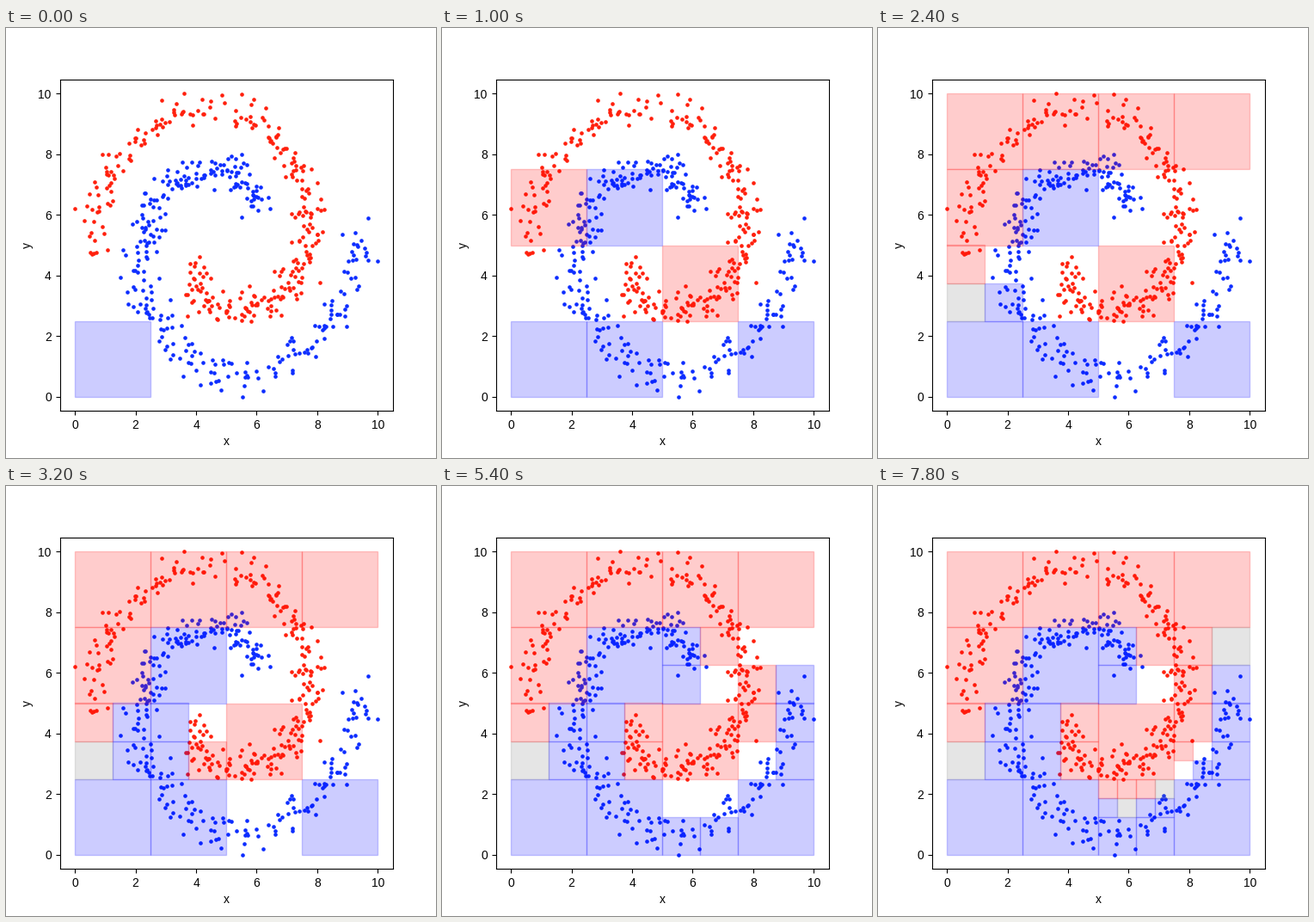
A matplotlib script that plays this animation: 500 px wide and 500 px high, repeating every 8 s.

```python
import matplotlib.pyplot as plt
import numpy as np
from matplotlib.animation import FuncAnimation
from matplotlib.patches import Rectangle

plt.rcParams["font.family"] = "Liberation Sans"

SIZE = 10
POINTS = 290
COLORS = ("#ff200d", "#0d2dff")
FILL = {"r": "red", "b": "blue", "k": "gray"}

# Cell classes per depth in Z-order; "s" is a mixed cell that is split further.
LEVELS = [
    "ssss",
    "bbss" "sbrs" "rbrr" "ssrr",
    "kbrb" "brbr" "bbss" "sbrb" "bsbr" "rbrk",
    "bkrr" "bbrk" "sbr",
]


def spiral_arms(rng):
    """Two noisy arms, half a turn apart, scaled together to the square."""
    arms = []
    for side in (1, -1):
        angle = np.linspace(-135, 184, POINTS)
        radius = np.interp(angle, [-130, -105, -40, 0, 40, 95, 180],
                           [1.35, 2.1, 2.48, 2.65, 3.2, 4.35, 4.25])
        turn = np.radians(angle)
        arm = side * radius * np.array([np.cos(turn), np.sin(turn)])
        noise = np.clip(rng.normal(0, 0.28, arm.shape), -0.65, 0.65)
        arms.append(arm + noise)
    both = np.hstack(arms)
    low = both.min(axis=1, keepdims=True)
    high = both.max(axis=1, keepdims=True)
    return [SIZE * (arm - low) / (high - low) for arm in arms]


def quadtree_cells():
    """Yield (x, y, side, class) for each pure cell, coarse to fine."""
    parents, side = [(0, 0)], SIZE
    for classes in LEVELS:
        side /= 2
        children = [(x + dx * side, y + dy * side)
                    for x, y in parents for dy in (0, 1) for dx in (0, 1)]
        parents = []
        for (x, y), kind in zip(children, classes):
            if kind == "s":
                parents.append((x, y))
            else:
                yield x, y, side, kind


fig, ax = plt.subplots(figsize=(5, 5), dpi=100)
for (x, y), color in zip(spiral_arms(np.random.default_rng(7)), COLORS):
    ax.scatter(x, y, s=11, color=color, linewidths=0)

cells = [ax.add_patch(Rectangle((x, y), side, side, color=FILL[kind],
                                alpha=0.2, linewidth=1))
         for x, y, side, kind in quadtree_cells()]

# Equal scale on both axes, centred on the square.
half_y = 5.5 * 0.77 / 0.775
ax.set_xlim(-0.5, 10.5)
ax.set_ylim(5 - half_y, 5 + half_y)
ax.set_xticks(range(0, 11, 2))
ax.set_yticks(range(0, 11, 2))
ax.set_xlabel("x")
ax.set_ylabel("y")


def update(frame):
    for i, cell in enumerate(cells):
        cell.set_visible(i <= frame)
    return cells


anim = FuncAnimation(fig, update, frames=len(cells), interval=200,
                     repeat=True, repeat_delay=0)
plt.show()
```
